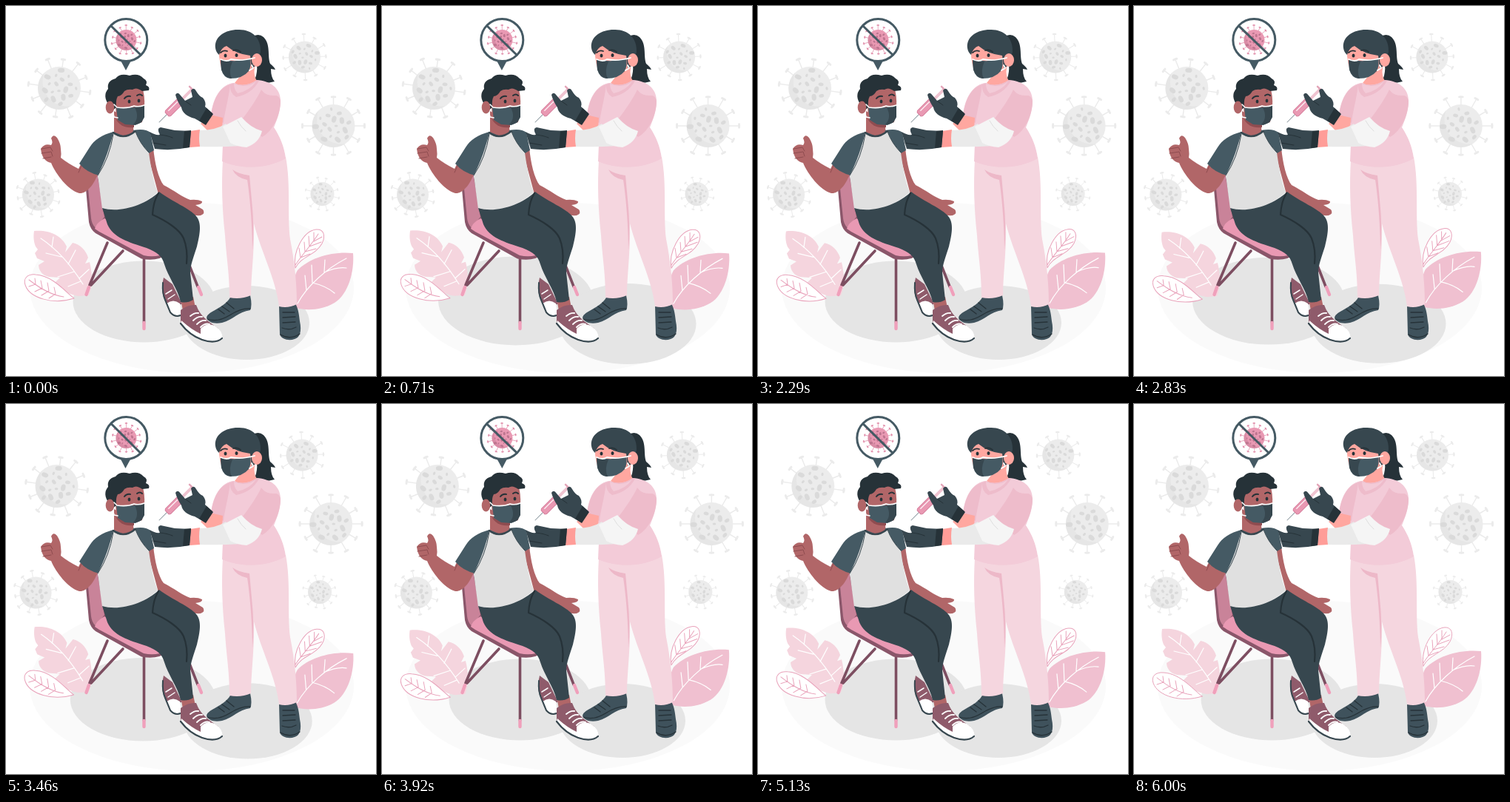
These frames come from a looping animation (500x500 px, 6040 ms). An HTML page:

```html
<!DOCTYPE html>
<html lang="en">
<head>
<meta charset="utf-8">
<title>Vaccination</title>
<style>
html, body { margin: 0; width: 100%; height: 100%; overflow: hidden; background: #fff; }
svg { display: block; width: 100vw; height: 100vh; }
.line { fill: none; stroke-linecap: round; stroke-linejoin: round; }
</style>
</head>
<body>
<svg viewBox="0 0 500 500">
  <ellipse cx="251" cy="381" rx="219" ry="115" fill="#fafafa"/>

  <g id="shadows" fill="#e5e5e5">
    <ellipse cx="186.500" cy="399.500" rx="96" ry="55"/>
    <ellipse cx="325" cy="428" rx="85" ry="50"/>
  </g>

  <g id="plants">
    <path fill="#f5d5de" d="M38 304C56 302 75 309 82 325L80 333 90 320C100 322 108 330 111 340L107 348 113 346C117 362 117 380 112 391L98 392C90 391 79 386 78 384 71 383 67 379 66 374L73 367 58 366C49 364 44 357 44 350L52 345 42 341 39 334 43 329 40 325C37 318 37 310 38 304Z"/>
    <g class="line" stroke="#fff" stroke-width="1.2">
      <path d="M47 314C68 328 88 350 104 376M62 326L64 312M75 339L54 334M84 349L94 330M92 359L70 366M99 368L112 356M101 372L84 379"/>
    </g>
    <g class="line" stroke="#e9a3bb" stroke-width="1">
      <path fill="#fff" d="M92 395C82 388 63 364 40 363 29 362 23 368 26 377 32 395 64 404 92 395Z"/>
      <path d="M31 370C48 383 62 391 78 393M40 376L39 368M49 381L47 371M58 385L56 374M67 389L65 380M40 376L31 379M49 381L39 386M58 385L48 391M67 389L58 395"/>
      <path fill="#fff" d="M391 354C387 332 402 304 419 302 430 301 432 311 427 321 418 337 399 338 391 354Z"/>
      <path d="M391 350C400 336 412 324 422 308M398 340L396 327M404 332L403 319M410 325L409 311M416 318L416 306M398 340L411 335M404 332L419 328M410 325L426 319M416 318L427 312"/>
    </g>
    <path fill="#f0c0d0" d="M392 408C388 390 387 368 394 357 410 340 442 331 469 334 471 358 463 389 444 401 427 411 407 412 392 408Z"/>
    <path class="line" stroke="#fff" stroke-width="1.2" d="M394 402C407 378 433 355 460 341M406 384L404 364M414 374L413 350M430 360L431 343M414 374Q432 378 444 388M430 360Q448 352 460 354"/>
  </g>

  <g id="viruses"></g>

  <!-- chair -->
  <g class="line" stroke="#7d4e61" stroke-width="3.600">
    <path d="M137 320L113 377M158 331L115 377M186.500 338V428M241 333L259 379"/>
    <path stroke="#f0a0bb" stroke-width="4.400" d="M112 380L108.500 390M186.500 428V436M260 380L264 390"/>
  </g>
  <path fill="#8a566a" d="M107 236L122 223 140 290 185 318 214 326 219 335Q204 346 183 341.500L121 307Q114 302 112 292Z"/>
  <path fill="#c98399" d="M110 237L123 226 133 285 121 300Q116 295 115 287Z"/>
  <path fill="#e999b3" d="M120 301Q122 293 133 287L155 300 205 325 218 333Q203 341 186 337L126 305Z"/>

  <!-- nurse: legs -->
  <g fill="#3f525c">
    <path d="M303 394L330 391Q333 405 330 411C314 413 307 424 292 428 282 430 273 428 271 421 273 412 294 409 303 394Z"/>
    <path d="M369 405L391 402C395 409 396 417 397 426 400 440 397 448 390 450 382 453 372 450 370 444Z"/>
  </g>
  <path class="line" stroke="#263238" stroke-width="1.300" d="M272 423Q286 428 302 418T330 409M287 410L295 416M292 406L302 413M298 401L308 409M374 414H390M374 421L391 420M374 428L391 427M373 435Q383 439 392 434M371 444Q384 452 397 443"/>
  <path fill="#f5d6df" d="M293 208Q335 216 378 204C385 240 380 285 384 315 391 350 393 380 393 403Q381 409 369 406C365 370 344 330 335 294 336 330 331 365 331 391Q317 397 302 394C302 360 298 342 296 310 292 275 291 240 293 208Z"/>
  <path fill="#edb8c8" d="M306 221Q314 227 329 229L332 262Q336 300 333 330C333 300 330 260 326 235Q311 232 306 221Z"/>

  <!-- nurse: head -->
  <path fill="#263238" d="M332 42Q341 36 348 42C358 52 353 67 357 78Q363 83 364 86L358 85Q358 97 363 102 349 106 335 102 343 86 336 65Z"/>
  <path fill="#ffa7a0" d="M288 58Q300 48 333 58L336 84Q334 94 340 103 325 115 309 104L317 94 295 92Q287 78 288 58Z"/>
  <path fill="#37474f" d="M283 57C281 41 297 32 313 32 332 31 345 43 344 62L339 80 332 84 330 67Q311 65 298 54 291 56 288 66 284 63 283 57Z"/>
  <ellipse cx="339" cy="73" rx="7" ry="9" fill="#ffa7a0"/>
  <path class="line" stroke="#263238" stroke-width="1.800" d="M290 63Q294 59 299 61M307 60Q313 58 317 62"/>
  <g fill="#263238"><ellipse cx="296.500" cy="67" rx="2" ry="2.600"/><ellipse cx="311.500" cy="66.500" rx="2" ry="2.600"/></g>
  <path fill="#455a64" d="M290 72Q311 77 330 71 332 80 328 88 320 98 303 98 294 97 291 86Z"/>
  <path fill="#37474f" d="M290 73Q300 76 306 75 300 88 305 98 295 97 291 86Z"/>
  <path class="line" stroke="#fff" stroke-width="1.800" d="M290 72Q299 76 304 72 318 75 336 70M329 87L334 84 332 80"/>

  <!-- nurse: top and arms -->
  <path fill="#f3cbd8" d="M306 104Q323 111 339 100C357 101 371 111 371 128 371 143 366 154 362 164 370 176 376 190 378 206 350 222 315 220 292 210L294 163 277 150C278 130 287 108 306 104Z"/>
  <path fill="#eebccb" d="M277 150C279 128 288 110 303 106 301 125 295 145 294 158ZM320 152C329 140 340 124 345 113 356 128 368 114 371 128 371 148 360 170 346 177Z"/>
  <path fill="#eebccb" d="M303 106L308 104Q324 111 339 100L342 101Q332 119 311 123 302 118 303 106Z"/>
  <path fill="#f3cbd8" d="M308 105Q324 112 338 102 330 114 313 118 308 113 308 105Z"/>
  <path fill="#ffa7a0" d="M276 147L293 151 292 166 274 170 263 159Z"/>
  <path fill="#eaeaea" d="M261 168Q284 168 297 159L318 189Q290 191 260 190Z"/>
  <path fill="#f5f5f5" d="M293 163L318 150Q331 165 346 169 342 185 325 191 312 190 303 185Z"/>
  <path class="line" stroke="#dedede" stroke-width="1" d="M313 155Q317 163 324 169"/>
  <path fill="#ff9d98" d="M249 169L262 167Q260 179 262 190L248 191Z"/>

  <!-- man: arms and neck -->
  <g fill="#b16668">
    <path d="M47 193Q52 185 61 188 64 184 61 179 64 172 69 178 74 186 74 193 75 200 74 205 84 213 98 220L103 210 125 224C119 243 108 254 99 253 84 249 67 227 61 212Q49 210 47 193Z"/>
    <path d="M186 180L199 191C201 213 206 233 213 242 227 249 239 259 249 262Q259 261 265 264 266 268 256 269L266 275Q270 280 263 283 250 284 240 277 222 270 208 262 198 251Z"/>
    <path d="M146 142V171Q158 181 173 172L171 156Z"/>
  </g>
  <path class="line" stroke="#8f4c50" stroke-width="1" d="M48 193L60 191 63 196M48 199L61 197 63 203M50 206L61 204M102 216L98 225"/>
  <path fill="#8f4c50" d="M148 152Q155 166 173 164V157Z"/>

  <!-- man: shirt -->
  <path fill="#455a64" d="M145 170C130 174 119 181 113 191L99 213Q109 225 126 229L155 205 160 176ZM172 168Q188 165 195 171L200 195 188 202 170 178Z"/>
  <path fill="#e0e0e0" d="M145 172Q159 183 175 169C180 184 188 192 193 198 196 219 199 236 205 252Q178 275 148 276 136 277 130 274L124 229C134 210 140 190 145 172Z"/>
  <path class="line" stroke="#37474f" stroke-width="2.500" d="M145 171Q159 182 175 169"/>
  <path class="line" stroke="#37474f" stroke-width="1" d="M145 173Q140 205 124 229M175 170Q181 186 193 198"/>

  <!-- man: legs -->
  <path fill="#8f5b6b" d="M213 367Q209 383 213 393L218 405 238 403 225 376Z"/>
  <path fill="#fff" d="M217 402Q226 395 235 402L237 417Q228 422 222 415Z"/>
  <path class="line" stroke="#37474f" stroke-width="2" d="M212 374Q211 388 215 397L222 414Q228 421 236 418"/>
  <path class="line" stroke="#fff" stroke-width="1.500" d="M216 389L224 384M219 396L228 390"/>
  <path fill="#b16668" d="M236 395L253 393 256 408 239 412Z"/>
  <path fill="#37474f" d="M130 273C153 280 187 270 207 251 224 264 249 274 257 284 265 293 262 309 258 325 254 338 249 350 249 360L253 397Q245 402 236 400C232 382 219 366 214 349 211 338 205 333 190 327 165 319 145 313 137 295Z"/>
  <path class="line" stroke="#263238" stroke-width="2.200" d="M206 253Q199 264 198 282C216 290 235 302 240 314Q246 329 244 348"/>
  <path fill="#8f5b6b" d="M236 411Q246 403 257 404 261 416 272 425L287 436 283 449Q250 447 236 428Z"/>
  <path fill="#fff" d="M263 436Q271 427 282 432 294 440 292 449 283 456 261 449 246 443 236 429L237 425Q250 437 263 443Z"/>
  <path class="line" stroke="#37474f" stroke-width="2.200" d="M236 429Q248 445 265 451 283 457 292 449"/>
  <path class="line" stroke="#fff" stroke-width="1.900" d="M249 419Q255 414 260 415M253 425Q259 419 265 420M258 430Q264 424 270 425M263 434Q269 428 275 430"/>

  <!-- man: head -->
  <path fill="#b16668" d="M147 112Q166 106 184 110 188 121 187 137L184 157Q167 163 149 153Z"/>
  <path fill="#263238" d="M139 134Q130 121 138 112 136 101 148 98 154 90 167 94 179 90 186 98 192 101 189 107 195 109 193 114L184 115Q176 109 171 113 164 112 160 115 156 122 151 122 148 127 149 137L143 142Z"/>
  <ellipse cx="140.500" cy="137" rx="5.800" ry="8.500" fill="#b16668"/>
  <path class="line" stroke="#263238" stroke-width="2" d="M160 125Q163 121 168 122M177 121Q181 118 184 121"/>
  <g fill="#263238"><ellipse cx="166.500" cy="129" rx="1.900" ry="2.500"/><ellipse cx="179.500" cy="128" rx="1.900" ry="2.500"/></g>
  <path fill="#455a64" d="M149 137Q168 139 187 134L187 150 183 157 175 161 161 160 151 154Z"/>
  <path fill="#37474f" d="M174 137L187 135V150L183 157Q178 161 172 160 181 151 174 137Z"/>
  <path class="line" stroke="#fff" stroke-width="1.600" d="M146 133L150 137Q164 139 173 135 179 137 187 134M151 151L146 150 145 146"/>

  <!-- syringe and gloves -->
  <g transform="translate(207 157) rotate(-45)">
    <path class="line" stroke="#8d9aa1" stroke-width="1" d="M0 0H15"/>
    <path fill="#e999b3" stroke="#d57d9b" d="M15 -3.500L17 -5H42V5H17L15 3.500Z"/>
    <path class="line" stroke="#fff" stroke-width="1.200" d="M20 -2H37"/>
    <path class="line" stroke="#f0c4d1" stroke-width="4" d="M43 0H62"/>
    <path class="line" stroke="#e3a5b9" stroke-width="2.500" d="M42 -8V8M63 -5V5"/>
  </g>
  <path fill="#37474f" d="M229 120Q232 115 236 121L242 128 252 123 250 114Q254 109 257 115 261 122 266 124 271 130 269 136L279 145 269 160 255 152Q239 148 237 137 231 128 229 120Z"/>
  <path fill="#263238" d="M271 138L280 146 270 161 261 155Z"/>
  <path class="line" stroke="#263238" stroke-width="1" d="M243 129L250 134"/>
  <path fill="#37474f" d="M194 170Q202 175 208 174 203 165 209 164L228 168 250 169 248 191Q224 196 201 193Z"/>
  <path class="line" stroke="#263238" stroke-width="1.100" d="M208 174Q218 175 225 178M199 185L216 188"/>
  <path fill="#263238" d="M241 169L250 168 248 191 239 192Z"/>

  <g id="badge">
    <path fill="#455a64" d="M154 72H170L162 87Z"/>
    <circle cx="162.300" cy="46" r="28.500" fill="#fff" stroke="#455a64" stroke-width="3"/>
    <g id="germ"></g>
    <path class="line" stroke="#455a64" stroke-width="3" d="M142 27L182 66"/>
  </g>
</svg>
<script>
const $ = id => document.getElementById(id);

// Body of radius r with n knobbed spikes reaching out to radius R.
function virus(x, y, r, R, n, turn, [body, spot, spike]) {
  let out = '';
  for (let i = 0; i < n; i++) {
    const a = turn + i * 360 / n, k = R - (i % 2) * r * 0.1, w = r * 0.08;
    out += `<path class="line" transform="rotate(${a})" stroke="${spike}" stroke-width="${r * 0.05}"
      d="M${r - 1} 0H${k}"/><path class="line" transform="rotate(${a})" stroke="${spike}"
      stroke-width="${r * 0.1}" d="M${k - 1} ${-w}V${w}"/>`;
  }
  out += `<circle r="${r}" fill="${body}"/>
    <path fill="${spot}" opacity=".35" d="M${r * 0.55} ${r * 0.835}A${r} ${r} 0 0 1 ${-r * 0.7} ${-r * 0.714}
      A${r * 1.15} ${r * 1.15} 0 0 0 ${r * 0.55} ${r * 0.835}Z"/>`;
  for (let i = 0; i < 18; i++) {
    const d = r * 0.2 * Math.sqrt(i + 0.4), a = i * 2.4 + turn;
    const size = r * (0.08 + 0.04 * (i * 7 % 3));
    out += `<ellipse fill="${spot}" rx="${size}" ry="${size * 0.68}"
      transform="translate(${d * Math.cos(a)} ${d * Math.sin(a)}) rotate(${i * 53})"/>`;
  }
  return `<g transform="translate(${x} ${y})">${out}</g>`;
}

const grey = ['#ececec', '#dadada', '#ebebeb'];
$('viruses').innerHTML = [
  [72, 111, 29, 43, 12, 8], [43.5, 255, 21.5, 31, 12, 20], [403.5, 69, 21.5, 32, 12, 28],
  [442.5, 162, 29, 43, 12, 0], [427.5, 254, 16, 24, 12, 14]
].map(v => virus(...v, grey)).join('');
$('germ').innerHTML = virus(162.5, 46, 14, 21, 14, 12, ['#e999b3', '#bd758f', '#e08ba8']);

const LOOP = 6040, SPAN = 6000, BEAT = 1500;
const shake = [[0, 0], [.1, -1], [.2, 2], [.3, -4], [.4, 4], [.5, -4], [.6, 4], [.7, -4], [.8, 2], [.9, -1], [1, 0]];
const wind = [[0, 0], [.25, 1], [.75, -1], [1, 0]];
const pulse = [[0, 1], [.1, 1.1], [.3, 1], [.4, 1], [.5, 1.1], [.6, 1], [1, 1]];

function at(steps, p) {
  const i = Math.max(1, steps.findIndex(s => s[0] >= p));
  const [p0, v0] = steps[i - 1], [p1, v1] = steps[i];
  return v0 + (v1 - v0) * (p - p0) / (p1 - p0);
}

function draw(now) {
  let t = now % LOOP;
  if (t >= SPAN) t = 0;
  const p = t % BEAT / BEAT, sway = at(wind, p);
  $('viruses').setAttribute('transform', `translate(${at(shake, p)} 0)`);
  $('plants').setAttribute('transform', `rotate(${sway} 247 356)`);
  $('badge').setAttribute('transform', `rotate(${sway} 162 46)`);
  $('shadows').setAttribute('transform',
    `translate(250 411) scale(${at(pulse, t / SPAN)}) translate(-250 -411)`);
}

const start = performance.now();
function tick() {
  draw(performance.now() - start);
  requestAnimationFrame(tick);
}
tick();
</script>
</body>
</html>
```
